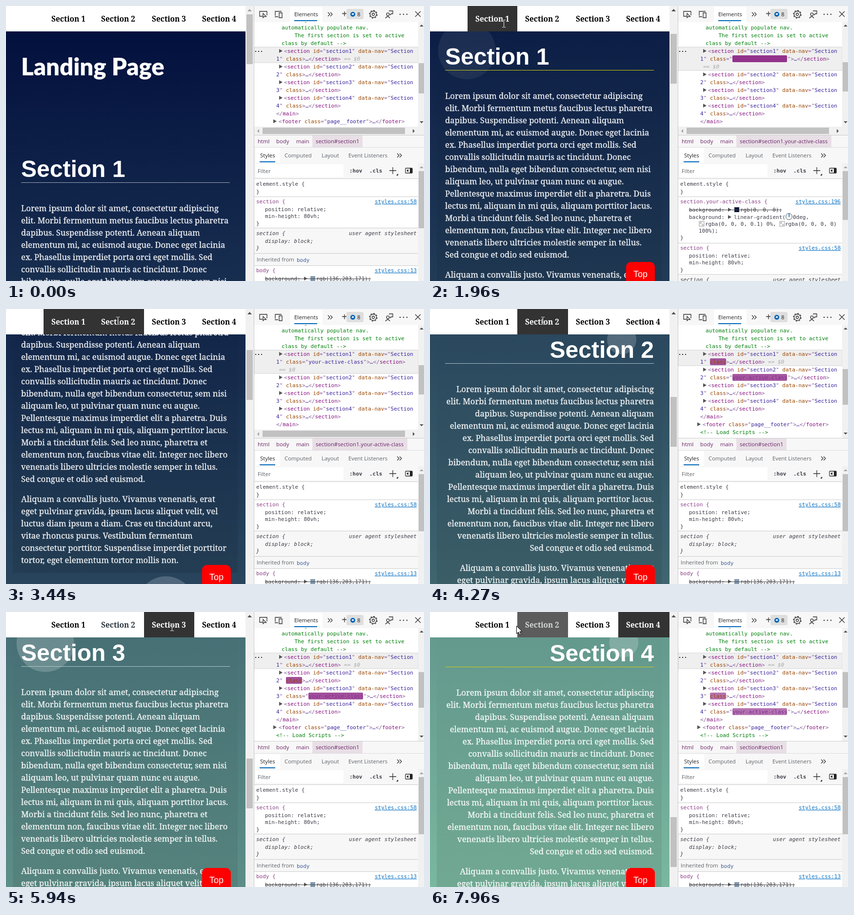
An HTML page that plays this animation: 857 px wide and 563 px high, repeating every 8 s.

```html
<!DOCTYPE html>
<html lang="en">
<head>
<meta charset="utf-8">
<title>Landing page with inspector</title>
<style>
  html, body { margin: 0; width: 100%; height: 100%; overflow: hidden; background: #fff; }
  svg { display: block; width: 857px; height: 563px; }
  text { white-space: pre; }
  .body { font: 16.6px "Noto Serif", serif; fill: #fff; stroke: #fff; stroke-width: .35; opacity: .92; }
  .title { font: 900 49px Lato, sans-serif; fill: #fff; }
  .head { font: bold 48px "Liberation Sans", Arial, sans-serif; fill: #fff; }
  .nav { font: bold 15.4px "Noto Serif", serif; }
  .top { font: 18px "Liberation Sans", Arial, sans-serif; fill: #fff; }
  .ui { font: 11.35px "Open Sans", sans-serif; fill: #5f6368; }
  .dark { fill: #222; }
  .crumb { fill: #6a2468; }
  .mono { font: 11px "DejaVu Sans Mono", monospace; fill: #3c3c48; }
  .bold { font-weight: bold; }
  .it { font-style: italic; }
  .link { fill: #0b72c4; text-decoration: underline; }
  .sel { fill: #8a3f86; }
  .inherited { fill: #3f5f9a; }
  .n { fill: #881280; }
  .p { fill: #8a5c98; }
  .a { fill: #994500; }
  .v { fill: #3a249c; }
  .c { fill: #00800a; }
  .g { fill: #aaa; font-style: italic; }
  .h { fill: color-mix(in srgb, #93338c var(--value), #3a249c); }
  .k { fill: color-mix(in srgb, #fff var(--name), #994500); }
  .icon { fill: none; stroke: #333; stroke-width: 1.3; }
</style>
</head>
<body>
<svg viewBox="0 0 857 563">
  <defs>
    <linearGradient id="sky" x2="0" y2="1"><stop stop-color="#000d3c"/><stop offset="1" stop-color="#88cbab"/></linearGradient>
    <linearGradient id="shade" x2="0" y2="1"><stop stop-opacity="0"/><stop offset="1" stop-opacity=".1"/></linearGradient>
    <clipPath id="pageClip"><path d="M0 0H491V563H0z"/></clipPath>
    <clipPath id="treeClip"><path d="M509 33H845V264H509z"/></clipPath>
  </defs>
  <g clip-path="url(#pageClip)"><g id="page"></g></g>
  <g id="topButton">
    <rect x="402" y="524" width="59" height="52" rx="10" fill="#f00"/>
    <text class="top" x="417" y="555">Top</text>
  </g>
  <g id="nav"></g>
  <g id="scrollbar"></g>
  <g id="chrome"></g>
  <g id="tree"></g>
  <g id="styles"></g>
  <g id="cursor"></g>
</svg>
<script>
const $ = id => document.getElementById(id);
const clamp = v => Math.max(0, Math.min(1, v));
const esc = s => s.replace(/&/g, '&amp;').replace(/</g, '&lt;');
const box = (x, y, w, h, fill, more = '') => `<rect x="${x}" y="${y}" width="${w}" height="${h}" fill="${fill}" ${more}/>`;
const path = (d, fill = '#505050') => `<path d="${d}" fill="${fill}"/>`;
const icon = d => `<path class="icon" d="${d}"/>`;
const text = (x, y, s, cls, more = '') => `<text x="${x}" y="${y}" class="${cls}" ${more}>${esc(s)}</text>`;
// y is the middle of a line of small text
const mono = (x, y, s, cls = '') => text(x, y + 4, s, 'mono ' + cls);
const ui = (x, y, s, cls = '') => text(x, y + 4, s, 'ui ' + cls);
const link = (y, s) => text(842, y + 4, s, 'mono link', 'text-anchor="end"');
const tri = (x, y) => path(`M${x} ${y - 4}l7 4l-7 4z`, '#555');
// spans are separated by ~ and start with their class letter
const rich = (x, y, s) => `<text x="${x}" y="${y + 4}" class="mono">` +
  s.split('~').map(p => `<tspan class="${p[0]}">${esc(p.slice(1))}</tspan>`).join('') + '</text>';

const PERIOD = 697, FIRST = 361;
const paragraphs = [`Lorem ipsum dolor sit amet, consectetur adipiscing
elit. Morbi fermentum metus faucibus lectus pharetra
dapibus. Suspendisse potenti. Aenean aliquam
elementum mi, ac euismod augue. Donec eget lacinia
ex. Phasellus imperdiet porta orci eget mollis. Sed
convallis sollicitudin mauris ac tincidunt. Donec
bibendum, nulla eget bibendum consectetur, sem nisi
aliquam leo, ut pulvinar quam nunc eu augue.
Pellentesque maximus imperdiet elit a pharetra. Duis
lectus mi, aliquam in mi quis, aliquam porttitor lacus.
Morbi a tincidunt felis. Sed leo nunc, pharetra et
elementum non, faucibus vitae elit. Integer nec libero
venenatis libero ultricies molestie semper in tellus.
Sed congue et odio sed euismod.`, `Aliquam a convallis justo. Vivamus venenatis, erat
eget pulvinar gravida, ipsum lacus aliquet velit, vel
luctus diam ipsum a diam. Cras eu tincidunt arcu,
vitae rhoncus purus. Vestibulum fermentum
consectetur porttitor. Suspendisse imperdiet porttitor
tortor, eget elementum tortor mollis non.`].map(p => p.split('\n'));

const sections = [
  { on: 1780, off: 3450, rule: '#cc1', circles: [[89, -36, 59, 4], [321, 624, 59, -5]] },
  { on: 3600, off: 5150, rule: '#a9bcc6', circles: [[400, -36, 30, 4]] },
  { on: 5350, off: 6800, rule: '#b0c9c6', circles: [[89, -36, 59, 4], [446, 557, 30, -5]] },
  { on: 7080, off: 1e9, rule: '#cc1', circles: [[400, -36, 30, 4]] },
];
const scrolls = [[1743, 264, 0, 250], [3314, 440, 250, 947], [5050, 440, 947, 1644], [6779, 440, 1644, 2340]];
const tabs = [[77, 93, 163], [179, 195, 267], [283, 299, 370], [386, 402, 475], [491]];
const lit = [[0, 1300, 3450], [1, 3050, 5150], [2, 4760, 6800], [3, 6300, 1e9], [2, 7604, 7780], [1, 7780, 7950]];
// moments when the inspector shows another active section (0 = none)
const states = [[0, 0], [1940, 1], [3620, 0], [3690, 2], [5350, 0], [5420, 3], [7100, 0], [7170, 4]];
const route = [[390, 548, 563], [520, 384, 274], [720, 384, 274], [1420, 151, 36], [2600, 151, 36], [3180, 228, 24],
  [4130, 231, 24], [4330, 231, 24], [4880, 340, 31], [5960, 340, 31], [6520, 464, 32], [7470, 464, 32], [7960, 177, 28], [8000, 177, 28]];

function buildPage() {
  let s = box(0, 0, 491, 3239, 'url(#sky)') + text(31, 142, 'Landing Page', 'title');
  sections.forEach((sec, i) => {
    const y = FIRST + PERIOD * i, right = i % 2, x = right ? 459 : 31;
    const anchor = right ? 'text-anchor="end"' : '';
    s += box(14, y - 95, 461, 665, 'url(#shade)', `id="shade${i}"`);
    sec.circles.forEach((c, n) => s += `<circle id="circle${i}${n}" r="${c[2]}" fill="#fff"/>`);
    s += text(x, y - 11, 'Section ' + (i + 1), 'head', anchor) + box(31, y, 428, 1, sec.rule, `id="rule${i}"`);
    let baseline = y + 59;
    for (const p of paragraphs) {
      for (const l of p) { s += text(x, baseline, l, 'body', anchor); baseline += 25; }
      baseline += 16;
    }
  });
  $('page').innerHTML = s;
}

function buildChrome() {
  const chevrons = (x, y) => icon(`M${x - 5} ${y - 4}l4 4l-4 4m5 -8l4 4l-4 4`);
  $('chrome').innerHTML = box(508, 0, 349, 563, '#fff') + box(508, 0, 349, 33, '#f7f7f7') +
    box(582, 2, 67, 31, '#fff') + box(591, 29, 47, 2, '#0067b8') + ui(591, 17, 'Elements', 'dark') +
    icon('M526 21h-6v-10h15v8M527 15v9l2.500 -2.500h4z') +
    icon('M552 20v-9h13M551 22h7M560 14h6v10h-6z') +
    chevrons(665, 17) + icon('M689 15.500h9M694 11v10') +
    box(698, 6, 35, 21, '#dedede', 'rx="3"') +
    '<circle cx="711" cy="17" r="5" fill="#0067b8"/>' + box(709, 15, 4, 3, '#fff') + ui(720, 17, '8', 'dark') +
    '<circle class="icon" cx="753" cy="17" r="6.500"/><circle class="icon" cx="753" cy="17" r="8" style="stroke-dasharray:3.200 3.080"/><circle class="icon" cx="753" cy="17" r="2.500"/>' +
    '<circle class="icon" cx="783" cy="17" r="2.800"/>' + icon('M778 25q5 -7 9 0M785 10h8v6h-3l-2 2v-2') +
    [808, 815, 822].map(x => `<circle cx="${x}" cy="17" r="1.200" fill="#333"/>`).join('') +
    icon('M839 11l11 11M850 11l-11 11') +
    box(508, 264, 349, 89, '#f7f7f7') + box(508, 264, 349, 1, '#ccc') + box(508, 289, 349, 1, '#ddd') +
    ui(516, 277, 'html', 'crumb') + ui(554, 277, 'body', 'crumb') + ui(595, 277, 'main', 'crumb') +
    box(512, 290, 50, 31, '#fff') + box(520, 318, 32, 2, '#0067b8') + ui(521, 306, 'Styles', 'dark') +
    ui(571, 306, 'Computed') + ui(647, 306, 'Layout') + ui(702, 306, 'Event Listeners') + chevrons(807, 306) +
    box(512, 324, 180, 26, '#fff') + ui(516, 338, 'Filter') +
    mono(704, 337, ':hov', 'bold') + mono(745, 337, '.cls', 'bold') +
    icon('M786 337h14M793 330v14') + path('M804 343v4h-4z', '#222') +
    '<rect class="icon" x="819" y="332" width="14" height="10" rx="1"/>' + path('M828 332h5v10h-5zM821 337l4 -3v6z', '#222') +
    box(508, 353, 349, 1, '#ccc') + box(508, 0, 1, 563, '#c8c8c8');
}

function drawTree(t) {
  const n = states.findLastIndex(s => t >= s[0]), [since, active] = states[n];
  const removed = active ? states[n - 2]?.[1] : states[n - 1]?.[1];
  const p = clamp((t - since) / 1400), glow = 1 - p * p;
  const mark = (x, y, w) => box(x, y - 7, w, 14, '#93338c', `rx="2" opacity="${glow}"`);
  const wide = active < 2;
  let s = box(509, 84, 336, active === 1 ? 48 : 32, '#efefef', 'stroke="#d4d4d4" stroke-width="1"');
  s += [511, 517, 523].map(x => box(x, 92, 2, 2, '#222')).join('');
  s += mono(565, 28, '     tags', 'c') + mono(565, 44, 'automatically populate nav.', 'c') +
    mono(565, 60, '    The first section is set to active', 'c') + mono(565, 76, 'class by default -->', 'c');
  let y = 92;
  for (let i = 1; i <= 4; i++, y += 16) {
    s += tri(560, y) + rich(570, y, `p<~nsection~a id~p="~vsection${i}~p"~a data-nav~p="~vSection`);
    y += 16;
    if (active === i) s += mark(620, y, 112);
    if (removed === i) s += mark(574, y, 33);
    const value = active === i ? '~p="~hyour-active-class~p"' : '';
    const own = i === 1 && active !== 1 ? '~g == $0' : '';
    s += rich(554, y, `v${i}~p" ~${removed === i ? 'k' : 'a'}class${value}~p>~v…~p</~nsection~p>${own}`);
    if (i === 1 && active === 1) s += mono(560, y += 16, '== $0', 'g');
  }
  s += rich(554, y, 'p</~nmain~p>') + tri(548, y + 16) +
    rich(559, y + 16, 'p<~nfooter~a class~p="~vpage__footer~p">~v…~p</~nfooter~p>') +
    mono(554, y + 32, '<!-- Load Scripts -->', 'c') + rich(554, y + 48, 'p<~nscript~a src~p="~vjs/app.js~p">');

  const [top, height] = active === 1 ? [115, 60] : wide ? [117, 62] : [123, 73], down = wide ? 236 : 253;
  let bars = box(845, 33, 12, 231, '#f1f1f1') + box(846, top, 11, height, '#c1c1c1') +
    path(`M848 42h8l-4 -4zM848 ${down}h8l-4 4z`);
  if (wide) bars += box(509, 247, 348, 17, '#f1f1f1') + box(526, 249, 292, 13, '#c1c1c1') +
    path('M519 252v8l-4 -4z', '#a3a3a3') + path('M834 252v8l4 -4z');
  const crumb = active === 1 ? [195, 'section#section1.your-active-class'] : [103, 'section#section1'];
  bars += box(628, 265, crumb[0], 24, '#e8dfe6') + ui(635, 277, crumb[1], 'crumb');
  $('tree').innerHTML = `<g clip-path="url(#treeClip)">${s}</g>${bars}`;
  $('tree').style.setProperty('--value', glow * 100 + '%');
  $('tree').style.setProperty('--name', clamp(1 - 3 * p) * 100 + '%');
}

function buildStyles(withClass) {
  const rule = y => box(509, y, 336, 1, '#ccc');
  let s = mono(513, 364, 'element.style {') + mono(513, 380, '}') + rule(390), y = 400;
  if (withClass) {
    const swatch = (x, y) => box(x, y - 5, 10, 10, '#fff', 'stroke="#999"') + path(`M${x} ${y - 5}h5v10h5v-5h-10z`, '#ccc');
    s += mono(513, 400, 'section.your-active-class {', 'sel') + link(400, 'styles.css:196') +
      mono(531, 417, 'background:') + tri(611, 417) + box(624, 412, 10, 10, '#0a1538') + mono(636, 417, 'rgb(0, 0, 0);') + box(531, 417, 190, 1, '#444') +
      mono(531, 432, 'background:') + tri(611, 432) + mono(623, 432, 'linear-gradient(') +
      '<circle cx="736" cy="431" r="6.500" fill="#f4f7fa" stroke="#555"/>' + box(735.5, 425, 1.5, 7, '#0067b8') + mono(744, 432, '0deg,') +
      swatch(552, 446) + mono(564, 446, 'rgba(0, 0, 0, 0.1) 0%,') + swatch(717, 446) + mono(728, 446, 'rgba(0, 0, 0, 0)') +
      mono(551, 460, '100%);') + mono(513, 474, '}') + rule(485);
    y = 495;
  }
  s += mono(513, y, 'section {', 'sel') + link(y, 'styles.css:58') + mono(531, y + 16, 'position: relative;') +
    mono(531, y + 30, 'min-height: 80vh;') + mono(513, y + 45, '}') +
    box(509, y + 54, 336, 77, '#f7f7f7') + rule(y + 54) + mono(513, y + 65, 'section {', 'it') +
    text(842, y + 69, 'user agent stylesheet', 'mono it', 'text-anchor="end"') +
    mono(531, y + 81, 'display: block;', 'it') + mono(513, y + 95, '}', 'it') + rule(y + 106) +
    ui(514, y + 119, 'Inherited from') + mono(596, y + 120, 'body', 'inherited') + rule(y + 131) +
    mono(513, y + 141, 'body {', 'sel') + link(y + 141, 'styles.css:13') +
    mono(531, y + 158, 'background:') + tri(611, y + 158) + box(624, y + 153, 10, 10, '#8499ae') +
    mono(636, y + 158, 'rgb(136,203,171);') + box(531, y + 158, 217, 1, '#444');
  s += box(845, 322, 12, 241, '#f1f1f1') + box(846, 338, 11, withClass ? 100 : 117, '#c1c1c1') + path('M848 332h8l-4 -4z', '#a3a3a3');
  $('styles').innerHTML = s;
}

function scrollAt(t) {
  let y = 0;
  for (const [start, length, from, to] of scrolls) if (t >= start) {
    const p = clamp((t - start) / length);
    y = from + (to - from) * p * p * (3 - 2 * p);
  }
  return y;
}

function drawPage(t, scroll) {
  $('page').setAttribute('transform', `translate(0 ${-Math.round(scroll)})`);
  $('topButton').setAttribute('visibility', scroll > 20 ? 'visible' : 'hidden');
  $('rule0').setAttribute('fill', t < 1740 ? '#a0a8b8' : '#cc1');
  sections.forEach(({ on, off, circles }, i) => {
    const isOn = t >= on && t < off, fade = clamp((t - on) / 500) - clamp((t - off) / 500);
    $('shade' + i).setAttribute('opacity', +isOn);
    circles.forEach(([x, y, , period], n) => {
      const angle = (t - on) / 1000 / period * 2 * Math.PI, r = isOn ? 14 : 0, c = $(`circle${i}${n}`);
      c.setAttribute('cx', x - r * Math.cos(angle));
      c.setAttribute('cy', FIRST + PERIOD * i + y - r * Math.sin(angle));
      c.setAttribute('opacity', .187 * fade);
    });
  });
  $('scrollbar').innerHTML = box(491, 0, 17, 563, '#f1f1f1') + box(493, 17 + Math.round(scroll * .1723), 13, 102, '#c1c1c1') +
    path('M495 11h9l-4.500 -5z', scroll ? '#505050' : '#a3a3a3');
}

function drawNav(t) {
  let s = box(0, 0, 491, 52, '#fff');
  for (let i = 0; i < 4; i++) {
    const level = Math.max(...lit.filter(l => l[0] === i).map(([, on, off]) =>
      clamp((Math.min(t, off) - on) / 200) - clamp((t - off) / 200)), 0);
    const base = i === 1 && t > 5350 ? '#2a363e' : '#000';
    s += box(tabs[i][0], 0, tabs[i + 1][0] - tabs[i][0], 52, '#333', `opacity="${level}"`) +
      text(tabs[i][1], 32, 'Section ' + (i + 1), 'nav', `style="fill:color-mix(in srgb,#fff ${level * 100}%,${base})"`);
  }
  $('nav').innerHTML = s;
}

function drawCursor(t) {
  const n = route.findLastIndex(r => t >= r[0]);
  if (n < 0) return $('cursor').innerHTML = '';
  const [t0, x0, y0] = route[n], [t1, x1, y1] = route[n + 1] || [8000, x0, y0];
  const p = clamp((t - t0) / (t1 - t0 || 1)), x = Math.round(x0 + (x1 - x0) * p), y = Math.round(y0 + (y1 - y0) * p);
  const overText = y > 14 && y < 40 && tabs.some(([, from, to]) => x >= from && x <= to);
  const beam = `M${x - 3} ${y - 7.5}h2.500l1 1l1 -1h2.500M${x + .5} ${y - 7}v14M${x - 3} ${y + 7.5}h2.500l1 -1l1 1h2.500`;
  $('cursor').innerHTML = overText
    ? `<path d="${beam}" fill="none" stroke="#333" stroke-width="2.500"/><path d="${beam}" fill="none" stroke="#fff"/>`
    : `<path d="M${x + .5} ${y + .5}v16l4 -3.500l2.500 6l2.500 -1l-2.500 -6h5z" fill="#fff" stroke="#000"/>`;
}

let shownStyles;
function draw(now) {
  const t = now % 8000, withClass = t >= 1940 && t < 3400;
  drawPage(t, scrollAt(t));
  drawNav(t);
  drawTree(t);
  if (withClass !== shownStyles) buildStyles(shownStyles = withClass);
  drawCursor(t);
}

buildPage();
buildChrome();
const started = performance.now();
(function frame() {
  draw(performance.now() - started);
  requestAnimationFrame(frame);
})();
</script>
</body>
</html>
```
